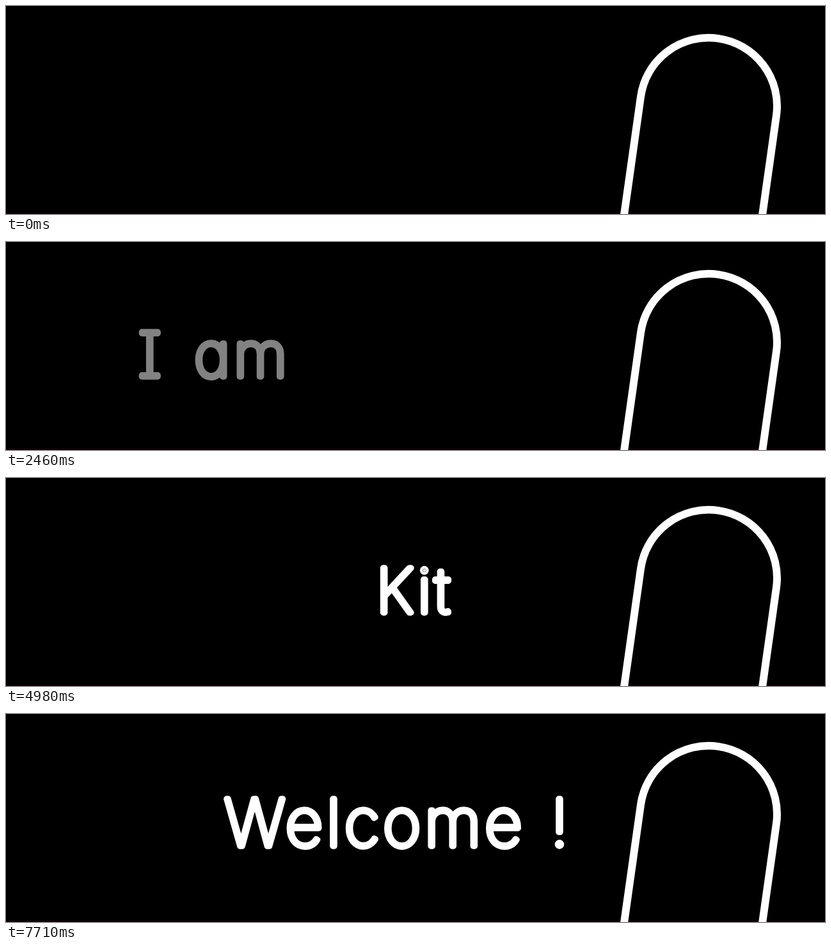
Animation, 1280 px wide and 326 px high, one loop 8 s. Source, as an HTML page:

```html
<!DOCTYPE html>
<html lang="en">
<head>
<meta charset="utf-8">
<title>Hi, welcome</title>
<style>
  html, body { margin: 0; width: 100%; height: 100%; overflow: hidden; background: #000; }
  svg { display: block; width: 100%; height: 100%; }
  text { fill: #fff; stroke: #fff; stroke-linejoin: round; text-anchor: middle; }
  .round {
    font-family: Inter, "Open Sans", sans-serif;
    font-weight: 100;
    font-feature-settings: "cv08", "cv11";
    letter-spacing: 6px;
  }
  .slab { font: 900 120px "Noto Serif", serif; stroke-width: 6px; letter-spacing: -2px; }
  .italic { font: italic bold 138px "Liberation Serif", serif; stroke: none; }
</style>
</head>
<body>
<svg viewBox="0 0 1280 326">
  <defs>
    <clipPath id="hiClip"><rect width="1280" height="252"/></clipPath>
    <clipPath id="rowClip"><rect width="1280" height="245"/></clipPath>
  </defs>
  <rect width="1280" height="326"/>
  <rect y="323" width="1280" height="3" fill="#100008"/>
  <rect x="992" y="50" width="214" height="420" rx="107" transform="rotate(8 1100 150)"
        fill="none" stroke="#fff" stroke-width="12"/>
  <g clip-path="url(#hiClip)"><g id="hi"></g></g>
  <g clip-path="url(#rowClip)"><g id="iam"></g><g id="last"></g></g>
  <g id="first"></g>
  <g id="welcome"></g>
  <text id="slab" class="slab" x="628" y="207">Kit</text>
  <text id="italic" class="italic" x="626" y="226">Kit</text>
</svg>
<script>
const LOOP = 8000, ENTER = 855, STEM = 12.5, SPACING = 6;
const $ = id => document.getElementById(id);

// Proportions of the thin face, so that a round outline brings it to STEM.
const ctx = document.createElement('canvas').getContext('2d');
ctx.font = '100 1000px Inter, "Open Sans", sans-serif';
const bar = ctx.measureText('l');
const stemRatio = (bar.actualBoundingBoxLeft + bar.actualBoundingBoxRight) / 1000;
const capRatio = ctx.measureText('H').actualBoundingBoxAscent / 1000;

function addWord(group, word, centre, top, bottom) {
  const size = (bottom - top - STEM) / (capRatio - stemRatio);
  const outline = Math.max(0, STEM - stemRatio * size);
  const text = document.createElementNS('http://www.w3.org/2000/svg', 'text');
  text.textContent = word;
  text.setAttribute('class', 'round');
  text.setAttribute('x', centre + SPACING / 2);
  text.setAttribute('y', bottom - outline / 2);
  text.style.fontSize = size + 'px';
  text.style.strokeWidth = outline + 'px';
  $(group).append(text);
}

addWord('hi', 'Hi', 595, 132, 219);
addWord('hi', '!', 718.5, 132, 219);
addWord('iam', 'I', 283, 136, 216);
addWord('iam', 'am', 425, 136, 216);
addWord('first', 'Kit', 636, 136, 216);
addWord('last', 'Val', 804, 136, 216);
addWord('welcome', 'Welcome', 574, 128, 212);
addWord('welcome', '!', 865, 128, 212);

const progress = (t, start, length) => Math.min(1, Math.max(0, (t - start) / length));
const remaining = (t, start) => (1 - progress(t, start, ENTER)) ** 3;
const leaving = (t, start, end) => progress(t, start, end - start) ** 2;

function place(id, from, to, t, x, y, opacity = 1) {
  const el = $(id);
  el.setAttribute('visibility', t >= from && t < to ? 'visible' : 'hidden');
  el.setAttribute('transform', `translate(${x} ${y})`);
  el.setAttribute('opacity', opacity);
}

function render(t) {
  place('hi', 0, 2070, t, 0, 122 * (remaining(t, 0) + leaving(t, 1800, 2070)));

  const drop = 110 * leaving(t, 4560, 4960);
  const iam = remaining(t, 2280), first = remaining(t, 2663), last = remaining(t, 3065);
  place('iam', 2280, 4980, t, -119 * iam, drop, 1 - iam);
  place('first', 2663, 5190, t, -119 * first, 0, 1 - first);
  place('last', 3065, 4980, t, 0, 110 * last + drop);

  place('slab', 5190, 6120, t, 0, 0);
  place('italic', 6120, 6480, t, 0, 0);

  const welcome = remaining(t, 6660);
  place('welcome', 6660, LOOP, t, 0, 12 * welcome, 1 - welcome);
}

const began = performance.now();
function tick() {
  render((performance.now() - began) % LOOP);
  requestAnimationFrame(tick);
}
tick();
</script>
</body>
</html>
```
